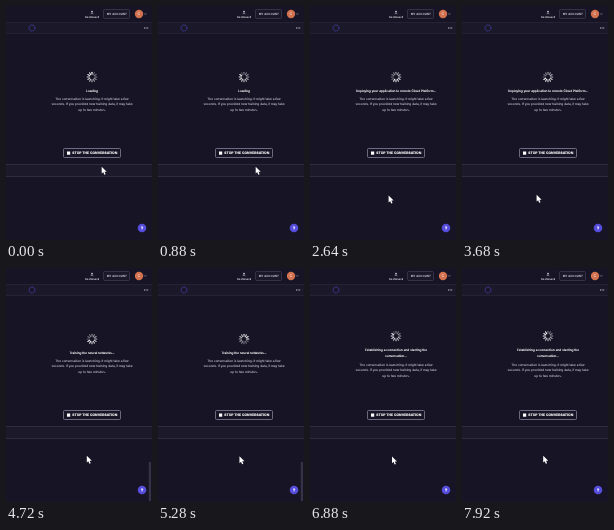
An HTML page that plays this animation: 146 px wide and 234 px high, repeating every 8000 ms.

```html
<!DOCTYPE html>
<html lang="en">
<head>
<meta charset="utf-8">
<style>
  html, body { margin: 0; width: 100%; height: 100%; overflow: hidden; background: #171425; }
  svg { display: block; width: 146px; height: 234px; }
  text { font: 3.15px Inter, "Open Sans", sans-serif; text-anchor: middle; text-rendering: geometricPrecision; }
  .bold { font-weight: 700; fill: #fff; stroke: #fff; stroke-width: .14; }
  .note { fill: #c2c0cc; stroke: #c2c0cc; stroke-width: .08; }
  .small { font-size: 2.9px; font-weight: 600; fill: #dddbe6; }
</style>
</head>
<body>
<svg viewBox="0 0 146 234">
  <rect width="146" height="234" fill="#171425"/>

  <!-- header -->
  <circle cx="86" cy="5.6" r=".9" fill="#d0ceda"/>
  <path d="M84.6 7.8q1.4-1.6 2.8 0" fill="none" stroke="#d0ceda" stroke-width=".6"/>
  <text x="86" y="11.5" class="small" style="font-size:2.7px">Dashboard</text>
  <rect x="97.5" y="3.5" width="26" height="9" rx="1" fill="#1b182a" stroke="#3d3a4d" stroke-width=".8"/>
  <text x="110.8" y="9.1" class="small">MY ACCOUNT</text>
  <circle cx="133" cy="8" r="4.2" fill="#d2714f"/>
  <text x="133" y="9.3" style="font-size:3.8px" fill="#fff">C</text>
  <path d="M138.2 7.4l1 1 1-1" fill="none" stroke="#bbb9c8" stroke-width=".6"/>

  <!-- toolbar -->
  <rect y="16" width="146" height="12" fill="#1b182a"/>
  <path d="M0 16.5h146M0 27.5h146" stroke="#252235"/>
  <circle cx="26" cy="22" r="3" fill="none" stroke="#4b43bd" stroke-width=".9" stroke-dasharray="1.5 .856"/>
  <path d="M138 22h1m.6 0h1m.6 0h1" stroke="#c5c3d0"/>

  <g id="spinner"></g>
  <g id="title" class="bold"></g>
  <g id="note" class="note"></g>

  <rect x="57.5" y="142.5" width="57" height="9" rx="1" fill="none" stroke="#77758a" stroke-width=".9"/>
  <rect x="61" y="145.5" width="3.2" height="3.2" fill="#fff"/>
  <text x="88.8" y="148.4" class="bold" style="font-size:3.4px">STOP THE CONVERSATION</text>

  <!-- message bar -->
  <rect y="158" width="146" height="13" fill="#1c192b"/>
  <path d="M0 158.5h146M0 170.5h146" stroke="#2f2c40"/>

  <rect id="scroll" x="142.8" y="194" width="2.2" height="39" fill="#353345"/>
  <circle cx="136" cy="222" r="4.3" fill="#564ddd"/>
  <text x="136" y="223.6" class="bold" style="font-size:4.6px">?</text>
  <path id="cursor" d="M0 0v6.8l1.5-1.4 1.1 2.6 1.3-.5-1.1-2.5h2.2z" fill="#fff"/>
</svg>
<script>
const LOOP = 8000, STEP = 80, SPOKES = 12;
const $ = id => document.getElementById(id);

const titles = [
  [0, 'Loading'],
  [1280, 'Deploying your application to remote Cloud Platform...'],
  [4560, 'Training the neural networks...'],
  [5520, 'Establishing a connection and starting the', 'conversation...']
];
const note = [
  'The conversation is launching. It might take a few',
  'seconds. If you provided new training data, it may take',
  'up to two minutes.'
];
// time, x, y of the pointer tip
const path = [
  [0, 95.7, 160.7], [880, 97.7, 160.7], [1120, 97.7, 161], [1760, 86, 184],
  [2160, 80, 191], [2640, 78.6, 189.6], [3440, 74.6, 189], [4080, 74.6, 188.4],
  [4720, 80.8, 187.8], [5760, 82, 188.8], [6880, 82, 188.4], [7040, 81.2, 187.8]
];

const lines = (list, y, pitch) =>
  list.map((s, i) => `<text x="86" y="${y + i * pitch}">${s}</text>`).join('');

$('spinner').innerHTML = Array.from({ length: SPOKES }, (_, i) =>
  `<path d="M0-2.7V-4.8" stroke="#fff" stroke-width="1.1" stroke-linecap="round" transform="rotate(${i * 360 / SPOKES})"/>`
).join('');
$('note').innerHTML = lines(note, 0, 5.3);

function pointer(t) {
  const i = path.findIndex(k => k[0] > t);
  if (i < 0) return path.at(-1).slice(1);
  const [a, b] = [path[i - 1], path[i]];
  const u = (t - a[0]) / (b[0] - a[0]), e = u * u * (3 - 2 * u);
  return [1, 2].map(n => a[n] + (b[n] - a[n]) * e);
}

let shown;
function draw() {
  const t = Math.floor(performance.now() % LOOP / STEP) * STEP;
  const title = titles.findLast(k => k[0] <= t);
  const shift = title.length > 2 ? 3 : 0;

  if (title !== shown) {
    shown = title;
    $('title').innerHTML = lines(title.slice(1), 86.1 - shift, 5.7);
    $('note').setAttribute('transform', `translate(0 ${94.1 + shift * 1.3})`);
    $('spinner').setAttribute('transform', `translate(86 ${71 - shift})`);
  }
  [...$('spinner').children].forEach((spoke, i) => {
    const age = (t / 1000 - i / SPOKES + 1) % 1;
    spoke.setAttribute('opacity', 1 - .7 * age);
  });
  $('scroll').setAttribute('opacity', t >= 4560 && t < 5520 ? 1 : 0);
  $('cursor').setAttribute('transform', `translate(${pointer(t)})`);
  requestAnimationFrame(draw);
}
draw();
</script>
</body>
</html>
```
